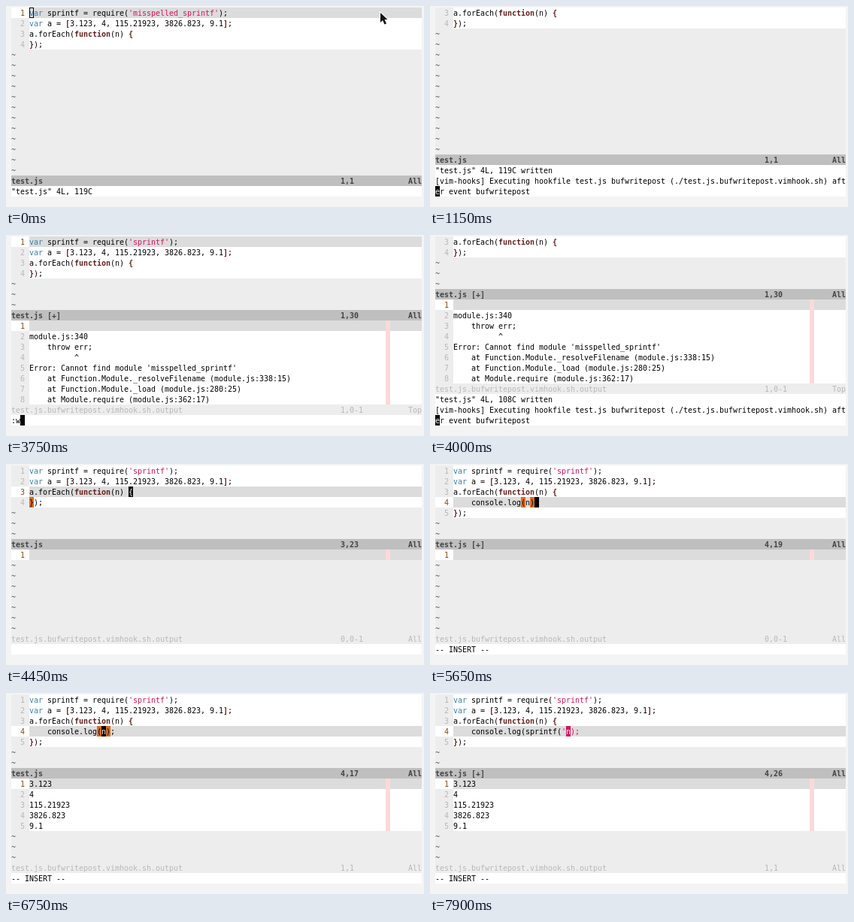
An HTML page with a canvas that plays this animation: 556 px wide and 268 px high, repeating every 8000 ms.

```html
<!DOCTYPE html>
<html lang="en">
<head>
<meta charset="utf-8">
<title>Vim write hook</title>
<style>
html, body { margin: 0; width: 556px; height: 268px; overflow: hidden; background: #f4f4f4; }
canvas { display: block; }
</style>
</head>
<body>
<canvas id="stage" width="556" height="268"></canvas>
<script>
const ctx = document.getElementById('stage').getContext('2d');
const LOOP = 8000, X = 7, Y = 2, CW = 6, RH = 14, BASE = 11, COLS = 91, LAST = 17;
const FONT = '10px "DejaVu Sans Mono", monospace';
const C = {
  page: '#f4f4f4', paper: '#fff', dim: '#ededed', line: '#dcdcdc', bar: '#bfbfbf', barText: '#444',
  faint: '#b8b8b8', text: '#000', tilde: '#555', num: '#8a4a10', key: '#3580a8', bold: '#65201c',
  str: '#d6135f', match: '#dc6c1c', margin: '#fcd9d9'
};

const hook = ['[vim-hooks] Executing hookfile test.js bufwritepost (./test.js.bufwritepost.vimhook.sh) aft',
  'er event bufwritepost'];
const failure = {
  pos: '1,0-1', part: 'Top',
  lines: ['', 'module.js:340', '    throw err;', '          ^',
    "Error: Cannot find module 'misspelled_sprintf'",
    '    at Function.Module._resolveFilename (module.js:338:15)',
    '    at Function.Module._load (module.js:280:25)',
    '    at Module.require (module.js:362:17)']
};
const empty = { pos: '0,0-1', part: 'All', lines: [''] };
const result = { pos: '1,1', part: 'All', lines: ['3.123', '4', '115.21923', '3826.823', '9.1'] };

const INSERT = ['-- INSERT --'];
const written = info => [`"test.js" ${info} written`];
const prompt = text => ({ msg: [text], mode: 'cmd' });
const done = { msg: [''], mode: 'normal', changed: false };

// One step per typed letter; make() gets the text typed so far.
const type = (text, times, make) => times.map((t, i) => [t, make(text.slice(0, i + 1))]);

const start = {
  lib: 'misspelled_sprintf', body: null, row: 0, col: 0, mode: 'blur', changed: false,
  msg: ['"test.js" 4L, 119C'], out: null, mouse: [498, 9]
};
const steps = [
  [50, { mouse: [503, 4] }],
  [100, { mouse: [510, -3] }],
  [150, { mouse: [516, -9] }],
  [250, { mouse: null }],
  [500, { mode: 'normal' }],
  [650, prompt(':')],
  [950, prompt(':w')],
  [1000, { msg: written('4L, 119C') }],
  [1050, { msg: [...written('4L, 119C'), ...hook] }],
  [1350, { ...done, out: failure }],
  [1950, { col: 4 }],
  [2150, { col: 12 }],
  [2250, { col: 14 }],
  [2550, { col: 21 }],
  [2600, { col: 23 }],
  [2700, { lib: '', mode: 'insert', msg: INSERT, changed: true }],
  ...type('sprintf', [2800, 2850, 2900, 2950, 3100, 3250, 3300],
    s => ({ lib: s, col: 23 + s.length })),
  [3500, { mode: 'normal', msg: [''], col: 29 }],
  [3550, prompt(':')],
  [3750, prompt(':w')],
  [3950, { msg: written('4L, 108C') }],
  [4000, { msg: [...written('4L, 108C'), ...hook] }],
  [4050, { ...done, out: empty }],
  [4200, { row: 1, col: 29 }],
  [4300, { row: 2, col: 22 }],
  [4500, { row: 3, col: 4, body: '    ', mode: 'insert', msg: INSERT, changed: true }],
  ...type('console.log(n);',
    [4600, 4650, 4750, 4800, 4850, 4950, 5000, 5050, 5150, 5200, 5300, 5450, 5500, 5650, 5800],
    s => ({ body: '    ' + s, col: 4 + s.length })),
  [5900, { mode: 'normal', msg: [''], col: 18 }],
  [6000, prompt(':')],
  [6100, prompt(':w')],
  [6200, { msg: written('5L, 128C') }],
  [6250, { msg: [...written('5L, 128C'), ...hook] }],
  [6350, { ...done }],
  [6450, { out: result }],
  [6600, { col: 17 }],
  [6650, { col: 16 }],
  [6750, { mode: 'insert', msg: INSERT }],
  ...type("sprintf('", [6850, 6900, 6950, 7050, 7100, 7150, 7250, 7400, 7800],
    s => ({ body: `    console.log(${s}n);`, col: 16 + s.length, changed: true }))
];

const stateAt = t => Object.assign({}, start, ...steps.filter(s => s[0] <= t).map(s => s[1]));

let scroll = 0;

function band(row, color, col = 0, count = COLS - col) {
  if (row < scroll) return;
  ctx.fillStyle = color;
  ctx.fillRect(X + col * CW, Y + (row - scroll) * RH, count * CW, RH);
}

function put(row, col, text, color = C.text, bold = false) {
  if (row < scroll) return;
  ctx.font = (bold ? 'bold ' : '') + FONT;
  ctx.fillStyle = color;
  [...text].forEach((ch, i) => ctx.fillText(ch, X + (col + i) * CW, Y + (row - scroll) * RH + BASE));
}

function block(row, col, ch = '', bg = '#000', color = '#fff') {
  band(row, bg, col, 1);
  put(row, col, ch, color);
}

const tokens = /'.*?(?:'|$)|\bvar\b|\bfunction\b|[{}[\]]/g;

function highlight(row, line) {
  put(row, 4, line.replace(tokens, m => ' '.repeat(m.length)));
  for (const m of line.matchAll(tokens)) {
    const color = m[0][0] === "'" ? C.str : m[0] === 'var' ? C.key : C.bold;
    put(row, 4 + m.index, m[0], color, color === C.bold);
  }
}

// Cells of the bracket at the cursor and of its partner.
function brackets(lines, { row, col, mode }) {
  const all = '([{)]}';
  const cells = lines.flatMap((line, r) => [...line].map((ch, c) => ({ ch, r, c })));
  const find = c => cells.findIndex(k => k.r === row && k.c === c && all.includes(k.ch));
  let at = find(col);
  if (at < 0 && mode === 'insert') at = find(col - 1);
  if (at < 0) return [];
  const kind = all.indexOf(cells[at].ch), dir = kind < 3 ? 1 : -1, other = all[(kind + 3) % 6];
  for (let i = at, depth = 0; cells[i]; i += dir) {
    if (cells[i].ch === cells[at].ch) depth++;
    if (cells[i].ch === other && --depth === 0) return [cells[at], cells[i]];
  }
  return [];
}

function pane(top, height, lines, current, paint, margin) {
  for (let i = 0; i < height; i++) {
    const row = top + i, here = i === current;
    band(row, C.dim);
    if (i >= lines.length) {
      put(row, 0, '~', C.tilde);
      continue;
    }
    if (here) band(row, C.paper, 0, 4);
    band(row, here ? C.line : C.paper, 4);
    if (margin) band(row, C.margin, 83, 1);
    put(row, 0, String(i + 1).padStart(3), here ? C.num : C.faint);
    paint(row, lines[i]);
  }
}

function status(row, name, pos, part, active) {
  band(row, active ? C.bar : C.dim);
  [[0, name], [73, pos], [88, part]].forEach(([col, text]) =>
    put(row, col, text, active ? C.barText : C.faint, active));
}

function pointer(x, y) {
  const arrow = new Path2D('M0 0V13L3 10L5.5 15.5L8 14.5L5.5 9H9.5Z');
  ctx.save();
  ctx.translate(x, y);
  ctx.lineWidth = 2;
  ctx.strokeStyle = '#fff';
  ctx.stroke(arrow);
  ctx.fillStyle = '#111';
  ctx.fill(arrow);
  ctx.restore();
}

function drawCursor(s, lines) {
  const { row, col } = s, line = lines[row];
  if (s.mode === 'blur') {
    ctx.strokeStyle = '#000';
    ctx.strokeRect(X + (4 + col) * CW + .5, Y + row * RH + .5, CW - 1, RH - 1);
    return;
  }
  const quoted = [...line.matchAll(/'.*?(?:'|$)/g)]
    .some(m => col >= m.index && col < m.index + m[0].length);
  block(row, 4 + col, line[col], quoted ? C.str : '#000');
}

function draw(t) {
  const s = stateAt(t);
  const lines = [`var sprintf = require('${s.lib}');`, 'var a = [3.123, 4, 115.21923, 3826.823, 9.1];',
    'a.forEach(function(n) {', ...(s.body === null ? [] : [s.body]), '});'];
  ctx.fillStyle = C.page;
  ctx.fillRect(0, 0, 556, 268);
  ctx.lineWidth = 1;

  scroll = s.msg.length - 1;
  const height = s.out ? 7 : 16;
  pane(0, height, lines, s.row, highlight);
  status(height, 'test.js' + (s.changed ? ' [+]' : ''), `${s.row + 1},${s.col + 1}`, 'All', true);
  if (s.out) {
    pane(8, 8, s.out.lines, 0, (row, line) => put(row, 4, line), true);
    status(16, 'test.js.bufwritepost.vimhook.sh.output', s.out.pos, s.out.part, false);
  }
  if (s.mode !== 'cmd') {
    // The partner lights up a moment after the cursor lands on the brace.
    if (t < 4300 || t >= 4450)
      for (const b of brackets(lines, s)) block(b.r, 4 + b.c, b.ch, C.match, C.text);
    drawCursor(s, lines);
  }

  scroll = 0;
  s.msg.forEach((text, i) => {
    const row = LAST + 1 - s.msg.length + i;
    band(row, C.paper);
    put(row, 0, text);
  });
  if (s.mode === 'cmd') {
    const last = s.msg[s.msg.length - 1], col = s.msg.length > 1 ? 0 : last.length;
    block(LAST, col, last[col]);
  }
  if (s.mouse) pointer(...s.mouse);
}

function tick() {
  draw(performance.now() % LOOP);
  requestAnimationFrame(tick);
}
tick();
</script>
</body>
</html>
```
